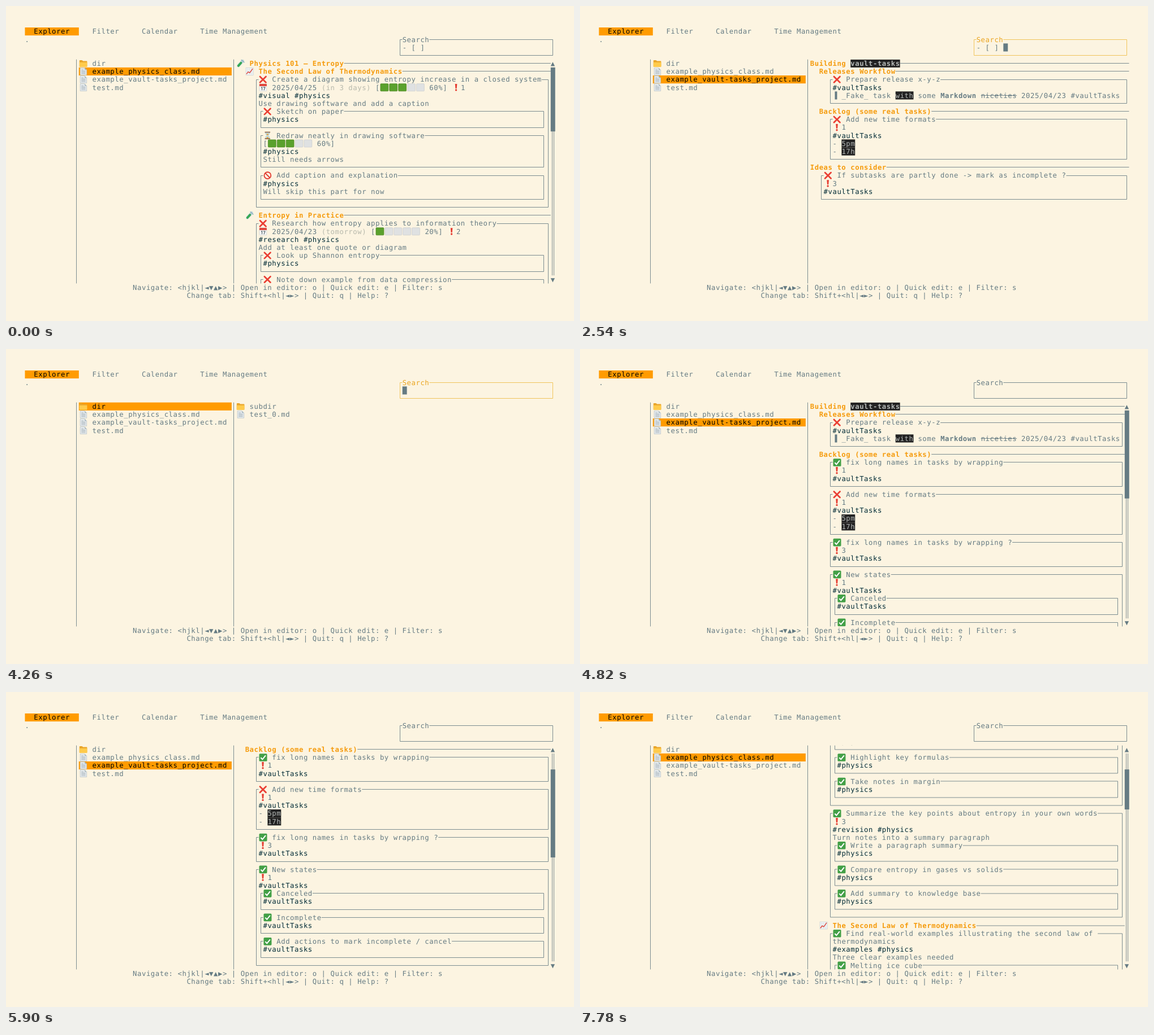
An HTML page that plays this animation: 1004x558 px, repeating every 8000 ms.

```html
<!DOCTYPE html>
<html lang="en">
<head>
<meta charset="utf-8">
<title>Task explorer</title>
<style>
  html, body { margin: 0; width: 100%; height: 100%; overflow: hidden; background: #fcf4e1; }
  svg { display: block; width: 100%; height: 100%; }
  text {
    font: 12.27px "DejaVu Sans Mono", monospace;
    letter-spacing: .556px;
    white-space: pre;
    text-rendering: geometricPrecision;
  }
</style>
</head>
<body>
<svg id="stage" viewBox="0 0 1004 558"></svg>
<script>
const LOOP = 8000;
const CW = 7.943, RH = 14.17, X0 = 33.47, Y0 = 38;
const TOP = 4, VIEW = 28, EDGE = 118;
const C = {
  fg: '#657b83', ink: '#002b36', black: '#000', orange: '#ff9b00', head: '#f59b0c',
  dim: '#b7b9ac', code: '#222', codeText: '#b4b8b6', focus: '#efbd45', focusText: '#eaa41e',
};

const x = c => X0 + c * CW;
const y = r => Y0 + r * RH;
const snap = v => Math.floor(v) + .5;
const midX = c => snap(x(c + .5));
const midY = r => snap(y(r + .5));
const esc = s => s.replace(/&/g, '&amp;').replace(/</g, '&lt;');

const rect = (c, r, w, h, fill) =>
  `<rect x="${x(c)}" y="${y(r)}" width="${w * CW}" height="${h * RH}" fill="${fill}"/>`;
const path = (d, color = C.fg) =>
  `<path d="${d}" fill="none" stroke="${color}" stroke-opacity=".85"/>`;
const text = (s, c, r, fill = C.fg, attrs = '') =>
  `<text x="${x(c)}" y="${y(r) + 11.4}" fill="${fill}" ${attrs}>${esc(s)}</text>`;

// Icons, each drawn in a 16 by 14 area two cells wide
const square = (fill, edge) =>
  `<rect x="1" y=".6" width="13.8" height="13" rx="1" fill="${fill}" stroke="${edge}" stroke-width=".8"/>`;
const ICONS = {
  '📁': `<path d="M1 2.2q0-.8.8-.8h4l1.4 1.5h6.6q.8 0 .8.8v8.5q0 .8-.8.8h-12q-.8 0-.8-.8z" fill="#e9a52a"/>
    <path d="M1 5h13.6v7.2q0 .8-.8.8h-12q-.8 0-.8-.8z" fill="#ffcb4c"/>`,
  '📄': `<path d="M2.4.8h7.8l3.6 3.6v9H2.4z" fill="#e6ebee" stroke="#b4c0c6" stroke-width=".7"/>
    <path d="M10.2.8v3.6h3.6z" fill="#a5b6bf"/>
    <path d="M4.4 4.2h4M4.4 6.4h7.4M4.4 8.5h7.4M4.4 10.7h7.4" stroke="#94a3ab" stroke-width=".8"/>`,
  '🧪': `<path d="M4 11.2L11.6 2.6" stroke="#b9d3da" stroke-width="5" stroke-linecap="round"/>
    <path d="M4 11.2L8.6 6" stroke="#35a853" stroke-width="3.8" stroke-linecap="round"/>
    <path d="M9.4.9l4.8 4.2" stroke="#8fb1bd" stroke-width="1.5" stroke-linecap="round"/>`,
  '📈': `<rect x="1.4" y=".7" width="13" height="12.8" fill="#f4f6f6" stroke="#c3ced2" stroke-width=".7"/>
    <path d="M4.6 1v12M7.9 1v12M11.2 1v12M2 4h12M2 7.1h12M2 10.3h12" stroke="#d0dde2" stroke-width=".6"/>
    <path d="M2.2 11.8L5.4 7.8l2.8 1.6 5.2-7.2" fill="none" stroke="#e0453a" stroke-width="1.4"/>`,
  '❌': '<path d="M2.4 2l10.6 10.4M13 2L2.4 12.4" stroke="#ea3e33" stroke-width="2.7" stroke-linecap="round"/>',
  '✅': `<rect x="1" y=".3" width="14" height="13.6" rx="1.6" fill="#43a047"/>
    <path d="M3.8 7.4l3 3.1 5.6-7" fill="none" stroke="#fff" stroke-width="2"/>`,
  '🚫': `<g fill="none" stroke="#e2382e" stroke-width="1.8"><circle cx="7.9" cy="7.1" r="5.9"/>
    <path d="M3.8 3l8.2 8.2"/></g>`,
  '⏳': `<path d="M4 1.5h7.6q0 3.6-2.7 5.6 2.7 2 2.7 5.6H4q0-3.6 2.7-5.6Q4 5.1 4 1.5z" fill="#bfe0ea" stroke="#9ab4ba" stroke-width=".6"/>
    <path d="M5.4 4h4.8L7.8 7.2zM7.8 9l2.9 3.4H4.9z" fill="#e8a33a"/>
    <path d="M3 1.2h9.6M3 13h9.6" stroke="#8a5a3c" stroke-width="1.5"/>`,
  '📅': `<rect x="1.6" y=".8" width="12.6" height="12.8" rx="1" fill="#f5f5f5" stroke="#c8cfd2" stroke-width=".6"/>
    <path d="M1.4 4.8V1.6q0-.9.9-.9h11.2q.9 0 .9.9v3.2z" fill="#e0463c"/>
    <path d="M4.6 7.2l1.4-.7v5.6M8 6.7h3.4l-2 5.4" fill="none" stroke="#4f5f66" stroke-width="1.1"/>`,
  '❗': '<path d="M5.7.9h3.6L8.6 9H6.4z" fill="#e53b30"/><circle cx="7.5" cy="11.7" r="1.7" fill="#e53b30"/>',
  '🟩': square('#5aa12d', '#48861f'),
  '⬜': square('#dfe1e2', '#cdd0d1'),
};
const icon = (ch, c, r) => `<g transform="translate(${x(c)} ${y(r)})">${ICONS[ch]}</g>`;

const TOKEN = new RegExp(
  '`[^`]+`|\\*\\*[^*]+\\*\\*|~~[^~]+~~|\\([a-z][^)]*\\)|' + Object.keys(ICONS).join('|') +
  '|▐|[^`*~(' + Object.keys(ICONS).join('') + '▐]+|.', 'gu');

// Writes one line of marked-up cells; returns its markup and the column after it
function write(line, c, r, fill = C.fg, attrs = '') {
  let out = '';
  const dated = line.startsWith('📅');
  for (const tok of line.match(TOKEN) || []) {
    let s = tok;
    if (ICONS[tok]) {
      out += icon(tok, c, r);
      c += 2;
      continue;
    }
    if (tok === '▐') out += rect(c + .5, r, .5, 1, C.fg);
    else if (tok[0] === '`') {
      s = tok.slice(1, -1);
      out += rect(c, r, s.length, 1, C.code) + text(s, c, r, C.codeText, attrs);
    } else if (tok.startsWith('**')) {
      s = tok.slice(2, -2);
      out += text(s, c, r, fill, 'font-weight="700" style="font-weight:700"');
    } else if (tok.startsWith('~~')) {
      s = tok.slice(2, -2);
      out += text(s, c, r, fill) + path(`M${x(c)} ${midY(r)}h${s.length * CW}`);
    } else out += text(s, c, r, dated && tok[0] === '(' ? C.dim : fill, attrs);
    c += s.length;
  }
  return [out, c];
}

function drawBox([title, ...body], r, left, right) {
  const [head, end] = write(title, left + 1, r);
  let out = head, row = r + 1;
  for (const item of body) {
    if (Array.isArray(item)) {
      const sub = drawBox(item, row, left + 1, right - 1);
      out += sub[0];
      row = sub[1];
    } else out += write(item, left + 1, row++, item[0] === '#' ? C.ink : C.fg)[0];
  }
  out += path(`M${x(left + 1)} ${midY(r)}H${midX(left)}V${midY(row)}H${midX(right)}V${midY(r)}H${x(end)}`);
  return [out, row + 1];
}

function drawDoc({ items, len }) {
  const right = EDGE - (len ? 1 : 0);
  let out = '', row = TOP, level = 0;
  for (const item of items) {
    if (Array.isArray(item)) {
      const box = drawBox(item, row, 47 + 2 * level, right - 1);
      out += box[0];
      row = box[1];
    } else if (item[0] === '#') {
      level = item.indexOf(' ');
      const [head, end] = write(item.slice(level + 1), 45 + 2 * level, row, C.head, 'style="font-weight:700"');
      out += head + path(`M${x(end)} ${midY(row)}H${x(right)}`);
      row++;
    } else out += write(item, 47, row++)[0];
  }
  return out;
}

const FILES = ['📁 dir', '📄 example_physics_class.md', '📄 example_vault-tasks_project.md', '📄 test.md'];
const NOTES = FILES.slice(1, 3);

const done = (name, tag) => ['✅ ' + name, tag];
const release = ['❌ Prepare release x-y-z', '#vaultTasks',
  '▐ _Fake_ task `with` some **Markdown** ~~niceties~~ 2025/04/23 #vaultTasks'];
const formats = ['❌ Add new time formats', '❗1', '#vaultTasks', '- `5pm`', '- `17h`'];
const project = ['# Building `vault-tasks`', '## Releases Workflow', release, '## Backlog (some real tasks)'];

const DOCS = {
  dir: { items: ['📁 subdir', '📄 test_0.md'] },
  physicsTodo: { len: 8, rate: .25, items: [
    '# 🧪 Physics 101 — Entropy',
    '## 📈 The Second Law of Thermodynamics',
    ['❌ Create a diagram showing entropy increase in a closed system',
      '📅 2025/04/25 (in 3 days) [🟩🟩🟩⬜⬜ 60%] ❗1', '#visual #physics',
      'Use drawing software and add a caption',
      ['❌ Sketch on paper', '#physics'],
      ['⏳ Redraw neatly in drawing software', '[🟩🟩🟩⬜⬜ 60%]', '#physics', 'Still needs arrows'],
      ['🚫 Add caption and explanation', '#physics', 'Will skip this part for now']],
    '## 🧪 Entropy in Practice',
    ['❌ Research how entropy applies to information theory',
      '📅 2025/04/23 (tomorrow) [🟩⬜⬜⬜⬜ 20%] ❗2', '#research #physics',
      'Add at least one quote or diagram',
      ['❌ Look up Shannon entropy', '#physics'],
      ['❌ Note down example from data compression', '#physics']],
  ] },
  physics: { len: 5, rate: .22, items: [
    '# 🧪 Physics 101 — Entropy',
    '## 🧪 Reading and Review',
    ['✅ Read the chapter on entropy', '❗2', '#reading #physics',
      'Focus on the definitions', 'and the worked examples',
      done('Read the introduction', '#physics'),
      done('Highlight key formulas', '#physics'),
      done('Take notes in margin', '#physics')],
    ['✅ Summarize the key points about entropy in your own words', '❗3', '#revision #physics',
      'Turn notes into a summary paragraph',
      done('Write a paragraph summary', '#physics'),
      done('Compare entropy in gases vs solids', '#physics'),
      done('Add summary to knowledge base', '#physics')],
    '## 📈 The Second Law of Thermodynamics',
    ['✅ Find real-world examples illustrating the second law of ', 'thermodynamics',
      '#examples #physics', 'Three clear examples needed',
      done('Melting ice cube', '#physics')],
  ] },
  projectTodo: { items: [...project, formats, '# Ideas to consider',
    ['❌ If subtasks are partly done -> mark as incomplete ?', '❗3', '#vaultTasks']] },
  project: { len: 11, rate: .43, items: [...project,
    ['✅ fix long names in tasks by wrapping', '❗1', '#vaultTasks'],
    formats,
    ['✅ fix long names in tasks by wrapping ?', '❗3', '#vaultTasks'],
    ['✅ New states', '❗1', '#vaultTasks',
      done('Canceled', '#vaultTasks'),
      done('Incomplete', '#vaultTasks'),
      done('Add actions to mark incomplete / cancel', '#vaultTasks')],
    ['✅ Keep track of skipped time in pomodoro', '❗2', '#vaultTasks'],
  ] },
};

// Each step lists only what differs from the step before
const STEPS = [
  [0, { files: FILES, sel: 1, doc: 'physicsTodo', query: '- [ ]', focus: false, scroll: 0 }],
  [500, { sel: 2, doc: 'projectTodo' }],
  [2540, { focus: true, query: '- [ ] ' }],
  [2660, { query: '- [ ]' }],
  [2980, { query: '- [ ' }],
  [3020, { sel: 0, doc: 'dir' }],
  [3340, { query: '- [' }],
  [3660, { query: '- ', files: NOTES, doc: 'physics' }],
  [3940, { query: '-' }],
  [4260, { query: '', files: FILES, doc: 'dir' }],
  [4580, { focus: false }],
  [4700, { sel: 1, doc: 'physics' }],
  [4820, { sel: 2, doc: 'project' }],
  ...[4900, 5100, 5300, 5500, 5700, 5900, 6060, 6260, 6460].map((t, i) => [t, { scroll: i + 1 }]),
  [7780, { sel: 1, doc: 'physics' }],
];
let last = {};
const STATES = STEPS.map(([at, change]) => last = { ...last, ...change, at });

const CHROME = rect(0, 0, 12, 1, C.orange) + text('Explorer', 2, 0, C.black) +
  text('Filter', 15, 0) + text('Calendar', 26, 0) + text('Time Management', 39, 0) + text('.', 0, 1) +
  [11, 46].map(c => path(`M${midX(c)} ${y(TOP)}V${y(TOP + VIEW)}`)).join('') +
  text('Navigate: <hjkl|◄▼▲▶> | Open in editor: o | Quick edit: e | Filter: s', 24, 32) +
  text('Change tab: Shift+<hl|◄►> | Quit: q | Help: ?', 36, 33) +
  `<clipPath id="view"><rect x="${x(47)}" y="${y(TOP)}" width="${71 * CW}" height="${VIEW * RH}"/></clipPath>`;

function drawSearch({ query, focus }) {
  const frame = `M${x(84)} ${midY(1)}H${midX(83)}V${midY(3)}H${midX(117)}V${midY(1)}H${x(90)}`;
  return path(frame, focus ? C.focus : C.fg) + text('Search', 84, 1, focus ? C.focusText : C.fg) +
    text(query, 84, 2) + (focus ? rect(84 + query.length, 2, 1, 1, C.fg) : '');
}

const drawFiles = ({ files, sel }) => rect(12, TOP + sel, 34, 1, C.orange) +
  files.map((f, i) => write(f, 12, TOP + i, i === sel ? C.black : C.fg)[0]).join('');

function drawBar({ len, rate }, scroll) {
  if (!len) return '';
  const c = EDGE - 1, mid = x(c + .5), end = TOP + VIEW - 1;
  const track = [-1.5, 1.5].map(d => path(`M${snap(mid + d)} ${y(TOP + 1)}V${y(end)}`)).join('');
  return track + text('▲', c, TOP) + text('▼', c, end) +
    rect(c, TOP + 1 + Math.floor(rate * scroll + .3), 1, len, C.fg);
}

function draw(s) {
  const doc = DOCS[s.doc];
  return CHROME + drawSearch(s) + drawFiles(s) +
    `<g clip-path="url(#view)"><g transform="translate(0 ${-s.scroll * RH})">${drawDoc(doc)}</g></g>` +
    drawBar(doc, s.scroll);
}

const stage = document.getElementById('stage');
let shown = null;
function update(t) {
  const state = STATES.findLast(s => s.at <= t);
  if (state === shown) return;
  shown = state;
  stage.innerHTML = draw(state);
}

const start = performance.now();
function tick() {
  update((performance.now() - start) % LOOP);
  requestAnimationFrame(tick);
}
tick();
</script>
</body>
</html>
```
